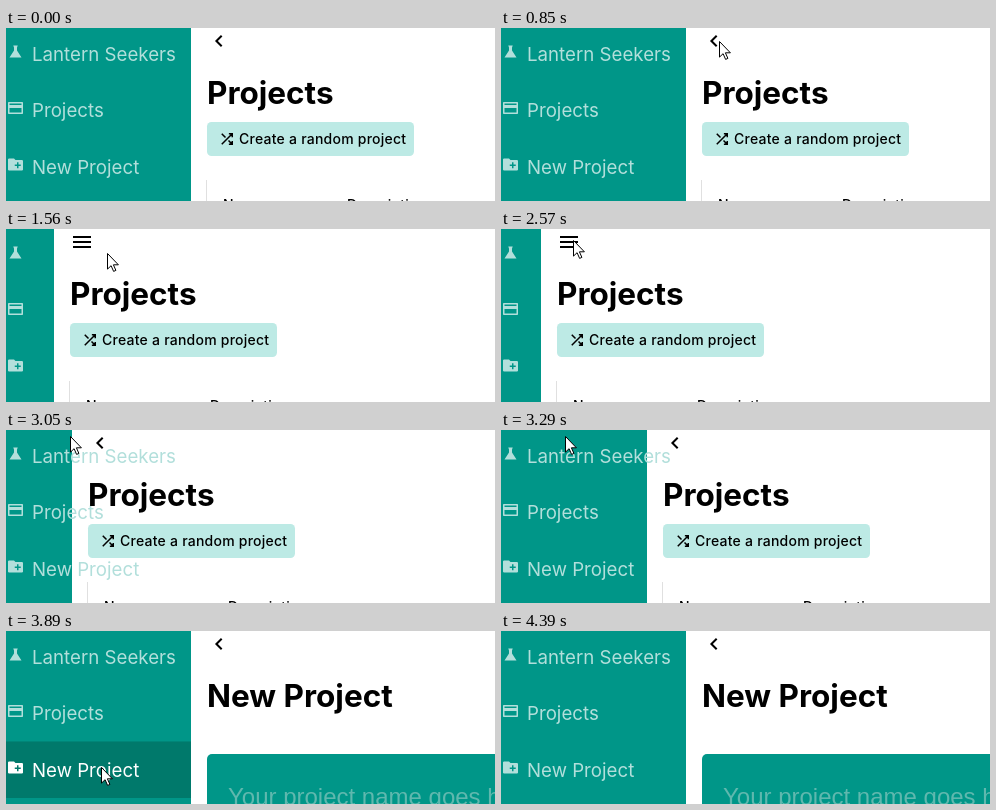
Write an HTML page that moves like this. It is 489 px wide and 173 px high and loops after 5170 ms.

```html
<!DOCTYPE html>
<html lang="en">
<head>
<meta charset="utf-8">
<title>Collapsing sidebar</title>
<style>
  html, body { margin: 0; height: 100%; overflow: hidden; background: #fff; }
  svg { display: block; width: 489px; height: 173px; font-family: Inter, sans-serif; }
  .row { fill: #b2dfdb; color: #b2dfdb; font-size: 18.7px; }
  .row rect { fill: none; }
  .row.hover { fill: #fff; color: #fff; }
  .row.hover rect { fill: #00796b; }
  .line { fill: none; stroke: currentColor; stroke-width: 2; }
  .title { font-size: 31.5px; font-weight: 700; }
  .button { font-size: 14px; font-weight: 500; letter-spacing: .24px; }
  .head { font-size: 14px; font-weight: 500; letter-spacing: .24px; }
  .placeholder { font: 24px "Liberation Sans", Arial, sans-serif; fill: #5fb8ae; }
</style>
</head>
<body>
<svg viewBox="0 0 489 173">
  <rect id="sidebar" height="173" fill="#009688"/>
  <g id="rows"></g>
  <g id="main">
    <path id="back" class="line" d="M14.700 7.700 9.400 13l5.300 5.300"/>
    <path id="menu" class="line" d="M3 8h18M3 13h18M3 18h18"/>
    <g id="list">
      <text class="title" y="76">Projects</text>
      <rect y="94" width="207" height="34" rx="4.5" fill="#bdeae5"/>
      <path class="line" transform="translate(11 102) scale(.75)" d="M5 5l5 5M5 19 19 5M14 14l5 5M14.5 5H19v4.5M14.5 19H19v-4.5"/>
      <text class="button" x="32" y="116">Create a random project</text>
      <path d="M-.5 152v30" stroke="#e0e0e0"/>
      <text class="head" x="16" y="182">Name</text>
      <text class="head" x="140" y="182">Description</text>
    </g>
    <g id="form">
      <text class="title" y="76">New Project</text>
      <rect y="123" width="500" height="80" rx="5" fill="#009688"/>
      <text class="placeholder" x="21" y="174">Your project name goes here</text>
    </g>
  </g>
  <path id="cursor" d="M.5.5v15.6l3.6-3.4 2.5 5.7 2.3-1-2.5-5.6h5z" fill="#fff" stroke="#000"/>
</svg>
<script>
const LOOP = 5170, OPEN = 185, CLOSED = 40, SLIDE = 640;
const COLLAPSE = 1017, EXPAND = 2872;

// The pointer enters from the lower right, then makes these moves
const entry = { x: 389, y: 158 };
const moves = [
  { from: 60, to: 570, x: 220, y: 23 },
  { from: 600, to: 850, x: 218, y: 13 },
  { from: 1050, to: 1560, x: 101, y: 24 },
  { from: 1560, to: 1860, x: 80, y: 16 },
  { from: 2515, to: 2690, x: 64, y: 6 },
  { from: 3340, to: 3470, x: 90, y: 120 },
  { from: 3480, to: 3570, x: 95, y: 136 },
  { from: 4270, to: 4390, x: 210, y: 163 }
];

const items = [
  ["Lantern Seekers", `<path d="M9 4h6l-1 2.5v4L20 20H4l6-9.500v-4z"/>`],
  ["Projects", `<path class="line" stroke-linejoin="round" d="M3 5h18v14H3zM3 9h18v2H3z"/>`],
  ["New Project", `<path fill-rule="evenodd" d="M3 4h7l2 2h9l1 1v12l-1 1H3l-1-1V5zM14 9v3h-3v2h3v3h2v-3h3v-2h-3V9z"/>`]
];

const $ = id => document.getElementById(id);
const show = (el, on) => el.style.display = on ? "" : "none";
const move = (el, x, y) => el.setAttribute("transform", `translate(${Math.round(x)} ${Math.round(y)})`);

$("rows").innerHTML = items.map(([label, icon], i) => `
  <g class="row" transform="translate(0 ${i * 56.5 - 2.5})">
    <rect height="56.5"/>
    <g transform="translate(.5 17) scale(.75)">${icon}</g>
    <text x="26" y="35.1">${label}</text>
  </g>`).join("");
const rows = [...document.querySelectorAll(".row")];

const progress = (t, from, to) => Math.min(1, Math.max(0, (t - from) / (to - from)));
const easeInOut = u => (1 - Math.cos(Math.PI * u)) / 2;
const easeOut = u => Math.sin(Math.PI / 2 * u);
const slide = (t, start) => easeInOut(progress(t, start, start + SLIDE));

function pointerAt(t) {
  return moves.reduce((p, m) => {
    const u = easeOut(progress(t, m.from, m.to));
    return { x: p.x + (m.x - p.x) * u, y: p.y + (m.y - p.y) * u };
  }, entry);
}

function draw(t) {
  const width = Math.round(OPEN + (CLOSED - OPEN) * (slide(t, COLLAPSE) - slide(t, EXPAND)));
  const open = t < 1030 || t >= 2870;
  const hovered = t < 3410 || t >= 4390 ? -1 : t < 3510 ? 1 : 2;

  $("sidebar").setAttribute("width", width);
  rows.forEach((row, i) => {
    row.classList.toggle("hover", i === hovered);
    row.querySelector("rect").setAttribute("width", width);
    show(row.querySelector("text"), open);
  });

  move($("main"), width + 16, 0);
  show($("back"), open);
  show($("menu"), !open);
  show($("list"), t < 3890);
  show($("form"), t >= 3890);

  const pointer = pointerAt(t);
  show($("cursor"), t >= 60 && t < 4390);
  move($("cursor"), pointer.x, pointer.y);
}

const began = performance.now();
function tick() {
  draw((performance.now() - began) % LOOP);
  requestAnimationFrame(tick);
}
tick();
</script>
</body>
</html>
```
